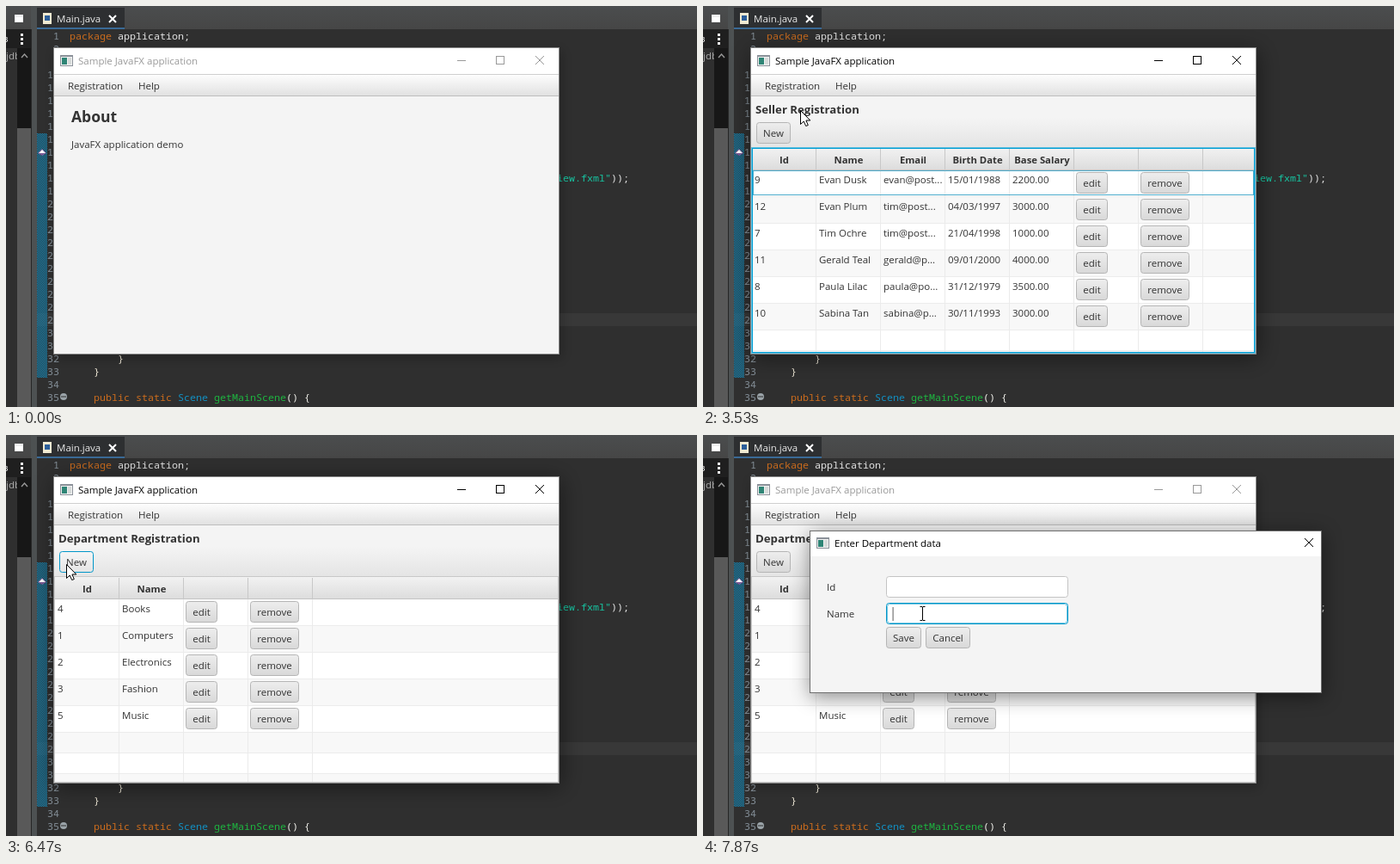
These frames come from a looping animation (804x466 px, 8 s). An HTML page with a canvas:

```html
<!DOCTYPE html>
<html lang="en">
<meta charset="utf-8">
<title>Sample JavaFX application</title>
<style>
  html, body { margin: 0; width: 100%; height: 100%; overflow: hidden; background: #2f2f2f }
  canvas { display: block }
</style>
<canvas id="stage" width="804" height="466"></canvas>
<script>
const W = 804, H = 466, LOOP = 8000;
const UI = '"Open Sans", "Noto Sans", sans-serif';
const MONO = '"Noto Sans Mono", "DejaVu Sans Mono", monospace';
const BLUE = '#0096c9', INK = '#333';
const stage = document.getElementById('stage').getContext('2d');
const layer = new OffscreenCanvas(W, H).getContext('2d');
let c = stage;

// Pointer tip: time, x, y
const PATH = [
  [330, 483, 66], [600, 290, 80], [870, 132, 88], [1000, 140, 90], [1130, 174, 92],
  [1730, 174, 92], [1930, 132, 92], [2130, 110, 96], [2330, 110, 96], [2730, 111, 121],
  [3470, 111, 121], [3530, 113, 121], [3600, 112, 121], [3730, 112, 121], [3930, 113, 92],
  [4470, 113, 92], [4670, 84, 146], [4930, 298, 164], [5200, 142, 125], [5330, 120, 110],
  [5400, 120, 110], [5530, 112, 93], [5600, 110, 94], [5800, 108, 152], [6000, 108, 152],
  [6330, 72, 148], [6470, 70, 150], [6800, 70, 150], [6870, 84, 152], [7270, 255, 207]
];

const SELLERS = {
  title: 'Seller Registration',
  heads: ['Id', 'Name', 'Email', 'Birth Date', 'Base Salary'],
  rows: [
    '9|Evan Dusk|evan@post...|15/01/1988|2200.00',
    '12|Evan Plum|tim@post...|04/03/1997|3000.00',
    '7|Tim Ochre|tim@post...|21/04/1998|1000.00',
    '11|Gerald Teal|gerald@p...|09/01/2000|4000.00',
    '8|Paula Lilac|paula@po...|31/12/1979|3500.00',
    '10|Sabina Tan|sabina@p...|30/11/1993|3000.00'
  ]
};
const DEPARTMENTS = {
  title: 'Department Registration',
  heads: ['Id', 'Name'],
  rows: ['4|Books', '1|Computers', '2|Electronics', '3|Fashion', '5|Music']
};
const MENUS = [
  { name: 'Registration', x: 64, w: 80, popup: 82, items: ['Seller', 'Department'] },
  { name: 'Help', x: 146, w: 41, popup: 51, items: ['About'] }
];

const within = (t, a, b) => t >= a && t < b;
const ramp = (t, a, b) => Math.min(1, Math.max(0, (t - a) / (b - a)));
const inBox = (p, x, y, w, h) => within(p.x, x, x + w) && within(p.y, y, y + h);

function rect(x, y, w, h, fill) {
  c.fillStyle = fill;
  c.fillRect(x, y, w, h);
}
function frame(x, y, w, h, color) {
  c.strokeStyle = color;
  c.lineWidth = 1;
  c.strokeRect(x + .5, y + .5, w - 1, h - 1);
}
function fade(y, h, top, bottom) {
  const g = c.createLinearGradient(0, y, 0, y + h);
  g.addColorStop(0, top);
  g.addColorStop(1, bottom);
  return g;
}
function text(s, x, y, color = INK, size = 11.5, weight = 400, align = 'left', font = UI) {
  c.font = `${weight} ${size}px ${font}`;
  c.textAlign = align;
  c.fillStyle = color;
  c.fillText(s, x, y);
}
const code = (s, x, y, color) => text(s, x, y, color, 11.667, 400, 'left', MONO);
function lines(d, color, width = 1) {
  c.strokeStyle = color;
  c.lineWidth = width;
  c.stroke(new Path2D(d));
}
function shape(d, color) {
  c.fillStyle = color;
  c.fill(new Path2D(d));
}
function rounded(x, y, w, h, fill, edge) {
  c.beginPath();
  c.roundRect(x + .5, y + .5, w - 1, h - 1, 3);
  c.fillStyle = fill;
  c.fill();
  c.strokeStyle = edge;
  c.lineWidth = 1;
  c.stroke();
}
function shadow(blur, dx, dy, alpha, draw) {
  c.save();
  c.shadowBlur = blur;
  c.shadowOffsetX = dx;
  c.shadowOffsetY = dy;
  c.shadowColor = `rgba(0,0,0,${alpha})`;
  draw();
  c.restore();
}
const cross = (x, y, r, color, width = 1) =>
  lines(`M${x - r} ${y - r}L${x + r} ${y + r}M${x + r} ${y - r}L${x - r} ${y + r}`, color, width);

function button(label, x, y, w, hover, focus) {
  rounded(x, y, w, 25, hover ? fade(y, 25, '#f6f6f6', '#e4e4e4') : fade(y, 25, '#eeeeee', '#d8d8d8'),
    focus ? BLUE : '#b5b5b5');
  text(label, x + w / 2, y + 17, INK, 11.5, 400, 'center');
}
function field(x, y, focus) {
  rounded(x, y, 212, 25, '#fff', focus ? BLUE : '#c4c4c4');
  if (focus) {
    c.globalAlpha = .55;
    rounded(x + 1, y + 1, 210, 23, '#fff', BLUE);
    c.globalAlpha = 1;
  }
}
function windowIcon(x, y) {
  rect(x, y, 15, 13, '#8b9199');
  rect(x + 1, y + 2, 13, 10, '#f2f2f2');
  rect(x + 2, y + 3, 6, 8, '#2f8576');
  rect(x + 9, y + 3, 4, 8, '#d5dad9');
}

function editor() {
  rect(0, 0, W, H, '#2f2f2f');
  rect(0, 0, W, 27, fade(0, 27, '#4b4d4e', '#464646'));
  rect(36, 357, W - 36, 15, '#383838');

  // Side panel
  rect(0, 27, 30, 22, '#1f1f1f');
  text('jdb', 0, 62, '#aaa');
  rect(13, 49, 16, H, '#171717');
  rect(13, 142, 16, H, '#595959');
  rect(29, 0, 7, H, '#4d5152');
  rect(29, 27, 1, H, '#262626');
  frame(10, 10, 10, 9, '#eee');
  rect(10, 10, 10, 3, '#eee');
  rect(11, 13, 8, 5, '#fff');
  text('ɜ', -3, 42, '#ddd');
  for (const y of [33, 38, 43]) rect(17, y - 1, 3, 3, '#f0f0f0');
  lines('M18 60L21.5 56L25 60', '#999', 1.4);

  // Tab
  rect(36, 2, 102, 25, '#2d2f31');
  rect(36, 25, 102, 2, '#3a6a96');
  rect(43, 8, 10, 13, '#f1ead2');
  rect(45, 11, 6, 6, '#2d5f9a');
  text('Main.java', 59, 19, '#eaeaea');
  cross(124, 15, 4, '#fff', 2);

  // Gutter
  for (let y = 148; y < 432; y++)
    for (let x = 36 + y % 2; x < 48; x += 2) rect(x, y, 1, 1, '#1290c3');
  shape('M37 171L42 166L47 171L42 174Z', '#7c5a96');
  shape('M38 171L42 167L46 171Z', '#fff');
  const number = (n, y) => text(n, 62, y + 4, '#848f98', 11.667, 400, 'right', MONO);
  [1, 2, 3].forEach(n => number(n, 20 + 15 * n));
  for (let n = 10; n < 36; n++) number(n, 15 * n - 70);
  c.beginPath();
  c.arc(67, 454, 4, 0, 7);
  c.fillStyle = '#9aa3a8';
  c.fill();
  rect(64, 453.5, 6, 1, '#2f2f2f');

  // Code
  code('package', 74, 39, '#cc6c1d');
  code('application;', 130, 39, '#e6e6e6');
  code('iew.fxml"', 641, 204, '#17c6a3');
  code('));', 704, 204, '#e6e6e6');
  code('}', 130, 414, '#f0e9d8');
  code('}', 102, 429, '#f0e9d8');
  code('public static', 102, 459, '#cc6c1d');
  code('Scene', 200, 459, '#1290c3');
  code('getMainScene', 242, 459, '#1eb540');
  code('() {', 326, 459, '#f0f0ea');
  code('return', 130, 474, '#cc6c1d');
  code('mainScene;', 179, 474, '#e6e6e6');
}

function aboutView() {
  text('About', 76, 135, INK, 17.5, 700);
  text('JavaFX application demo', 76, 165);
}

function tableView(data, hover, focus, pressed) {
  const cols = data.heads.length, edge = i => 56 + 75 * i;
  text(data.title, 61, 125, INK, 13.2, 700);
  rect(56, 130, 587, 35, fade(130, 35, '#f4f4f4', '#e4e4e4'));
  button('New', 62, 135, 40, hover, pressed);

  c.save();
  c.beginPath();
  c.rect(56, 164, 587, 240);
  c.clip();
  rect(56, 164, 587, 240, '#fff');
  rect(56, 165, 587, 26, fade(165, 26, '#f2f2f2', '#dcdcdc'));
  rect(56, 190, 587, 1, '#c4c4c4');
  for (let i = 0, y = 191; y < 404; i++) {
    const row = data.rows[i], h = row ? 31 : 24;
    if (i % 2) rect(57, y, 586, h, '#f8f8f8');
    rect(57, y + h - 1, 586, 1, '#ececec');
    if (row) {
      row.split('|').forEach((s, j) => text(s, edge(j) + 4, y + 15));
      button('edit', edge(cols) + 3, y + 2, 37);
      button('remove', edge(cols + 1) + 3, y + 2, 57);
    }
    y += h;
  }
  for (let i = 1; i <= cols + 2; i++) {
    rect(edge(i), 166, 1, 25, '#c8c8c8');
    rect(edge(i), 191, 1, 213, '#ebebeb');
  }
  data.heads.forEach((s, i) => text(s, edge(i) + 38.5, 183, INK, 11.3, 700, 'center'));
  c.restore();
  frame(56, 164, 587, 240, focus ? '#5fbfe0' : '#c8c8c8');
  if (focus) {
    frame(57, 165, 585, 238, '#039ed3');
    frame(58, 191, 583, 29, '#4cabcb');
  }
}

function popup(menu, p) {
  const h = 8 + 24.5 * menu.items.length;
  shadow(11, 0, 5, .5, () => rect(menu.x, 105, menu.popup, h, '#fff'));
  frame(menu.x, 105, menu.popup, Math.round(h), '#b9b9b9');
  menu.items.forEach((s, i) => {
    const y = 109 + 24.5 * i, hot = inBox(p, menu.x, y, menu.popup, 24.5);
    if (hot) rect(menu.x + 1, y, menu.popup - 2, 24.5, BLUE);
    text(s, menu.x + 6, y + 17, hot ? '#fff' : INK);
  });
}

function mainWindow(t, p) {
  const active = within(t, 1200, 6730);
  const glow = active ? .5 + .5 * ramp(t, 1200, 1400) : .3;
  const ink = active ? '#000' : '#999';
  shadow(8 + 16 * glow, 2, 4, .2 + .25 * glow, () => rect(55, 48, 589, 357, '#8a8a8a'));
  rect(56, 49, 587, 30, '#fff');
  rect(56, 105, 587, 299, '#f4f4f4');
  windowIcon(63, 57);
  text('Sample JavaFX application', 84, 68, ink);
  rect(525, 63, 10, 1, ink);
  frame(570, 58, 10, 10, ink);
  cross(621, 63, 5, ink);

  const hover = t < 6730 && inBox(p, 62, 135, 40, 25);
  if (t < 2930) aboutView();
  else if (t < 5930) tableView(SELLERS, hover, true);
  else tableView(DEPARTMENTS, hover, t < 6470, within(t, 6470, 6730));

  rect(56, 80, 587, 25, fade(80, 25, '#fdfdfd', '#e0e0e0'));
  rect(56, 79, 587, 1, '#cfcfcf');
  rect(56, 104, 587, 1, '#bdbdbd');
  const lit = within(t, 1270, 2930) || within(t, 5600, 5930);
  const open = within(t, 1270, 2870) || within(t, 5600, 5870);
  const chosen = MENUS[p.x < 145 ? 0 : 1];
  for (const m of MENUS) {
    const hot = lit ? m === chosen : inBox(p, m.x, 80, m.w, 25);
    if (hot) rect(m.x, 80, m.w, 25, BLUE);
    text(m.name, m.x + 8, 97, hot ? '#fff' : INK);
  }
  if (open) popup(chosen, p);
}

function dialog(t) {
  const onName = t >= 7670;
  c = layer;
  c.clearRect(0, 0, W, H);
  rect(124, 111, 596, 189, '#6f6f6f');
  rect(125, 112, 594, 29, '#fff');
  rect(125, 141, 594, 158, '#f4f4f4');
  windowIcon(132, 119);
  text('Enter Department data', 153, 130, '#000');
  cross(705, 125, 5, '#000');
  text('Id', 144, 181);
  text('Name', 144, 212);
  field(213, 164, !onName);
  field(213, 195, onName);
  if (onName) rect(220.5, 200, 1.2, 16, '#777');
  button('Save', 213, 223, 41);
  button('Cancel', 259, 223, 52);
  c = stage;

  // The shadow appears only once the dialog is opaque
  const grow = ramp(t, 6670, 6870), scale = .955 + .045 * grow;
  const glow = ramp(t, 6800, 7070);
  shadow(8 + 14 * glow, 1, 4, .45 * glow, () => {
    c.globalAlpha = grow;
    c.translate(395, 160);
    c.scale(scale, scale);
    c.drawImage(layer.canvas, -395, -160);
  });
}

function pointer(t, p) {
  if (t >= 6870 && (inBox(p, 213, 164, 212, 25) || inBox(p, 213, 195, 212, 25))) {
    const x = p.x + .5, y = p.y;
    lines(`M${x - 3} ${y - 7.5}h2.5l.5 .5l.5 -.5h2.5M${x} ${y - 7}V${y + 8}` +
      `M${x - 3} ${y + 8.5}h2.5l.5 -.5l.5 .5h2.5`, '#000');
    return;
  }
  c.save();
  c.translate(p.x + .5, p.y + .5);
  const arrow = 'M0 0V16L3.7 12.5L6.2 18L8.8 17L6.4 11.5H11.3Z';
  shape(arrow, '#fff');
  lines(arrow, '#000');
  c.restore();
}

function tip(t) {
  const i = PATH.findIndex(k => k[0] > t);
  if (i < 0) return { x: 255, y: 207 };
  if (i === 0) return { x: -99, y: -99 };
  const [t0, x0, y0] = PATH[i - 1], [t1, x1, y1] = PATH[i];
  const f = ramp(t, t0, t1);
  return { x: Math.round(x0 + (x1 - x0) * f), y: Math.round(y0 + (y1 - y0) * f) };
}

function draw(t) {
  const p = tip(t);
  editor();
  mainWindow(t, p);
  if (t >= 6730) dialog(t);
  pointer(t, p);
}

// The screen updates 15 times a second
let start, last = -1;
function tick(now) {
  start ??= now;
  const step = Math.floor(((now - start) % LOOP + 4) * .015);
  if (step !== last) draw(Math.round(step * 100 / 15) * 10);
  last = step;
  requestAnimationFrame(tick);
}
requestAnimationFrame(tick);
</script>
</html>
```
